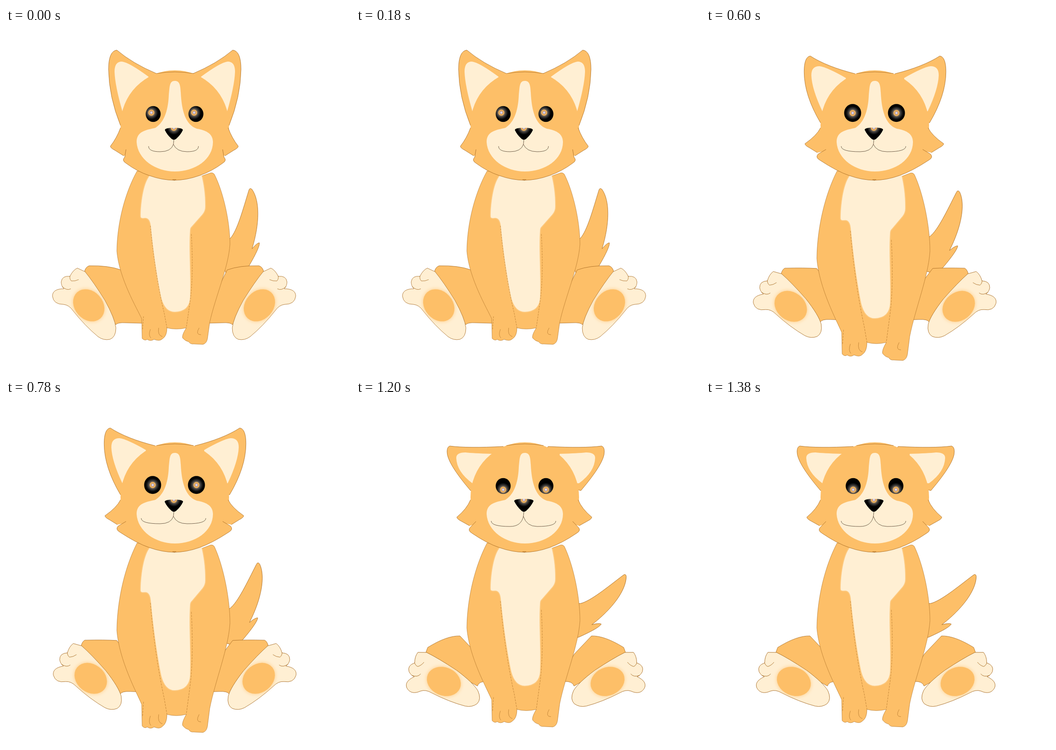
These frames come from a looping animation (748x748 px, 1500 ms). An HTML page with a canvas:

```html
<!DOCTYPE html>
<html lang="en">
<head>
<meta charset="utf-8">
<title>Sitting puppy</title>
<style>
html, body { margin: 0; width: 100%; height: 100%; overflow: hidden; background: #fff; }
canvas { display: block; }
</style>
</head>
<body>
<canvas id="stage" width="748" height="748"></canvas>
<script>
const ctx = document.getElementById('stage').getContext('2d');
const FUR = '#fdbf68', CREAM = '#ffefd3', LINE = '#a5681f';
const STEP = 300;

// droop lowers ears, tail and legs; stretch lengthens the body and spreads the cheeks;
// gaze holds the glint offsets: left x, right x, y
const poses = [
  { droop: 0, stretch: 0, wide: 0, grin: 0, gaze: [-4, -4, -3] },
  { droop: .16, stretch: .047, wide: 0, grin: .5, gaze: [0, 0, 0] },
  { droop: .28, stretch: .093, wide: 2.2, grin: 1, gaze: [0, 0, 0] },
  { droop: .57, stretch: .126, wide: 1, grin: 1, gaze: [6, -6, 7] },
  { droop: 1, stretch: .061, wide: 0, grin: 1, gaze: [0, 0, 8] }];
let pose;

const mix = (a, b, t) => a + (b - a) * t;
const easeX = () => pose.droop ** .75;
const easeY = () => pose.droop ** 1.1;
// A point on its way from the raised to the lowered place
const between = (x0, y0, x1, y1) => [mix(x0, x1, easeX()), mix(y0, y1, easeY())];

function paint(d, fill, line = LINE, width = 0.8) {
  const path = new Path2D(d);
  if (fill) { ctx.fillStyle = fill; ctx.fill(path); }
  if (line) { ctx.strokeStyle = line; ctx.lineWidth = width; ctx.stroke(path); }
}

// Strokes the edge, but fills it through an inner point
function flap(edge, inner) {
  paint(`${edge} L${inner}Z`, FUR, null);
  paint(edge);
}

function ellipse(x, y, rx, ry, fill, turn = 0) {
  ctx.beginPath();
  ctx.ellipse(x, y, rx, ry, turn, 0, 7);
  ctx.fillStyle = fill;
  ctx.fill();
}

function within(draw) { ctx.save(); draw(); ctx.restore(); }
function mirrored(width, draw) {
  within(draw);
  within(() => { ctx.transform(-1, 0, 0, 1, width, 0); draw(); });
}
function turned(x, y, deg, fromX, fromY) {
  ctx.translate(x, y);
  ctx.rotate(deg * Math.PI / 180);
  ctx.translate(-fromX, -fromY);
}
function stretched(amount, draw) {
  within(() => { ctx.transform(1, 0, 0, 1 + amount, 0, -312 * amount); draw(); });
}
function glow(color, blur) { ctx.shadowColor = color; ctx.shadowBlur = blur; }

function glint(x, y) {
  const g = ctx.createRadialGradient(x, y, 0, x, y, 15);
  [[0, '#d5dcff'], [.14, '#d8cbdc'], [.21, '#ab8c82'], [.29, '#f0b258'], [.4, '#eeb25e'],
   [.48, '#6e6258'], [.7, '#303030'], [1, '#000']].forEach(([at, c]) => g.addColorStop(at, c));
  return g;
}

function drawTail() {
  within(() => {
    turned(510.5, 449.5, 35.5 * pose.droop, 510.5, 449.5);
    paint('M455,480 L488,457 C503,440 515,395 528,353 Q530,346 535,351 C552,375 552,425 535,480 ' +
      'Q546,467 551,467 Q552,477 528,518 L515,535 L478,532Z', FUR);
  });
}

function drawLeg() {
  const ankle = between(171, 528, 152, 549), knee = between(181, 517, 156, 538);
  const hip = between(250, 526, 226, 513), heel = between(239, 645, 264, 622);
  const [, low] = between(0, 641, 0, 612);
  const crest = [(knee[0] + hip[0]) / 2 + 7, Math.min(knee[1], hip[1]) - 1];
  paint(`M${ankle} Q${ankle[0] + 3},${knee[1] + 2} ${knee} Q${crest} ${hip} L263,552 ` +
    `L300,${low + 1} L${heel[0] + 22},${low} Q${heel[0] + 3},${low - 1} ${heel} L190,580Z`, FUR);

  turned(...between(180, 603, 191, 612), -24.5 * easeX(), 180, 603);
  paint('M172,530 L155,522 Q145,527 139,540 Q122,538 120,552 Q120,561 126,567 Q101,567 101,583 ' +
    'Q103,601 125,601 Q137,602 146,615 Q172,648 200,671 Q212,680 226,677 Q239,672 239,652 ' +
    'Q237,632 215,592 Q190,552 172,530Z', CREAM);
  paint('M158,547 Q150,551 142,550 Q138,546 139,539 M141,567 Q132,572 122,562');
  glow('rgba(253,191,104,.75)', 9);
  ellipse(180, 603, 38, 30.5, FUR, 0.84);
}

function drawBody() {
  const { stretch } = pose;
  stretched(stretch, () => {
    paint('M285,311 C260,356 242,420 241,485 C246,545 285,610 295,632 L296,675 Q302,681 307,677 ' +
      'Q314,682 322,677 Q334,682 340,676 Q350,670 350,652 Q370,657 392,652 Q382,668 384,674 ' +
      'Q390,681 397,682 Q401,688 408,687 L428,688 Q436,686 438,676 L443,640 C455,585 484,520 487,470 ' +
      'C487,420 472,355 453,318 Q450,314 445,315 L425,322Z', FUR, LINE, 0.6);
  });
  stretched(Math.max(0, stretch - .047), () => {
    glow(CREAM, 3);
    paint('M316,312 L312,322 C298,340 293,385 293,410 Q293,414 300,413 Q313,411 315,430 ' +
      'C321,490 329,545 338,587 Q346,617 367,617 Q399,616 400,585 C402,540 397,480 400,440 ' +
      'Q400,434 404,431 L427,405 Q433,398 433,388 C433,360 430,340 424,316Z', CREAM, null);
  });
  stretched(stretch, () => {
    paint('M314,655 Q309,668 315,674 M332,652 Q329,668 340,671 M420,652 Q411,667 424,667', null, LINE, 0.6);
    ctx.setLineDash([4, 2]);
    paint('M314,430 C320,500 333,575 344,620 L350,652 M403,448 Q408,530 401,590 L392,652 M299,627 L297,655',
      null, LINE, 0.6);
  });
}

function drawEar() {
  const side = between(223, 90, 198, 112), tip = between(241, 48, 204, 100);
  paint(`M275,190 L249,${mix(212, 197, easeX())} Q${between(224, 150, 197, 136)} ${side} ` +
    `Q${side[0]},${tip[1] + 2} ${tip} Q${between(275, 77, 242, 105)} ${between(327, 99, 320, 101)} L345,130Z`, FUR);
  const edge = between(236, 95, 218, 126), top = between(252, 73, 238, 114);
  paint(`M253,181 Q${edge[0] + 1},${edge[1] + 30} ${edge} Q${edge[0]},${top[1]} ${top} ` +
    `Q${top[0] + 16},${top[1] + 2} ${between(310, 106, 295, 117)} L300,180Z`, CREAM, null);
}

function drawCheek() {
  const s = pose.stretch;
  const x = 227 - 127 * s, y = 257 - 630 * s * s;
  const lowX = 254 - 150 * s, lowY = 287 - 75 * s;
  flap(`M249,217 Q241,${y - 18} ${x},${y} Q${x},${y + 4} ${x + 10},${y + 9} L${lowX + 2},${lowY - 9}`, '300,260');
  flap(`M261,264 L${lowX + 4},${lowY - 6} Q${lowX - 3},${lowY + 1} ${lowX + 7},${lowY + 7} ` +
    'Q285,312 312,321 Q340,331 367,331', '367,250');
}

function drawHead() {
  mirrored(734 + 4 * pose.droop, drawEar);
  ellipse(367, 211.5, 118, 119.5, FUR);
  paint('M327,99 Q367,92 408,99');
  mirrored(732, drawCheek);
  paint('M362,330 L370,330', null, LINE, 1.2);
  paint('M367,115 C355,115 356,128 354,145 C353,174 346,204 325,217 C305,222 284,224 284,248 ' +
    'C286,285 325,312 367,312 C412,312 450,285 450,248 C450,228 432,222 415,219 ' +
    'C390,210 382,180 380,140 C379,125 378,115 367,115Z', CREAM, null);
}

function drawFace() {
  const { gaze, wide, droop, grin } = pose;
  [320 - wide / 2, 413 + wide / 2].forEach((x, i) => {
    const y = 187 - wide;
    ellipse(x, y, 16.3 + wide, 17.3 + wide, glint(x + gaze[i], y + gaze[2]));
  });

  const w = 19.5 + 1.5 * droop, top = 217 - 2 * droop;
  paint(`M${365 - w},${top + 5} Q${365 - w},${top} 365,${top} Q${365 + w},${top} ${365 + w},${top + 5} ` +
    `Q380,232 370,241 Q365,245 360,241 Q350,232 ${365 - w},${top + 5}Z`, glint(365, 217), null);

  const end = 310 - 16 * grin, far = 728.5 - end;
  const low = 269 + 6 * droop ** 4, endY = low - 12;
  paint(`M365,243 L364,253 Q359,${low} 335,${low} Q${end},${low} ${end},${endY} ` +
    `M364,253 Q371,${low} 394,${low} Q${far},${low} ${far},${endY}`, null, '#4a3a28');
}

function draw(now) {
  pose = poses[Math.floor(now / STEP) % poses.length];
  ctx.fillStyle = '#fff';
  ctx.fillRect(0, 0, 748, 748);
  drawTail();
  mirrored(731 + 7 * easeX(), drawLeg);
  drawBody();
  drawHead();
  drawFace();
}

const start = performance.now();
function loop() {
  draw(performance.now() - start);
  requestAnimationFrame(loop);
}
loop();
</script>
</body>
</html>
```
